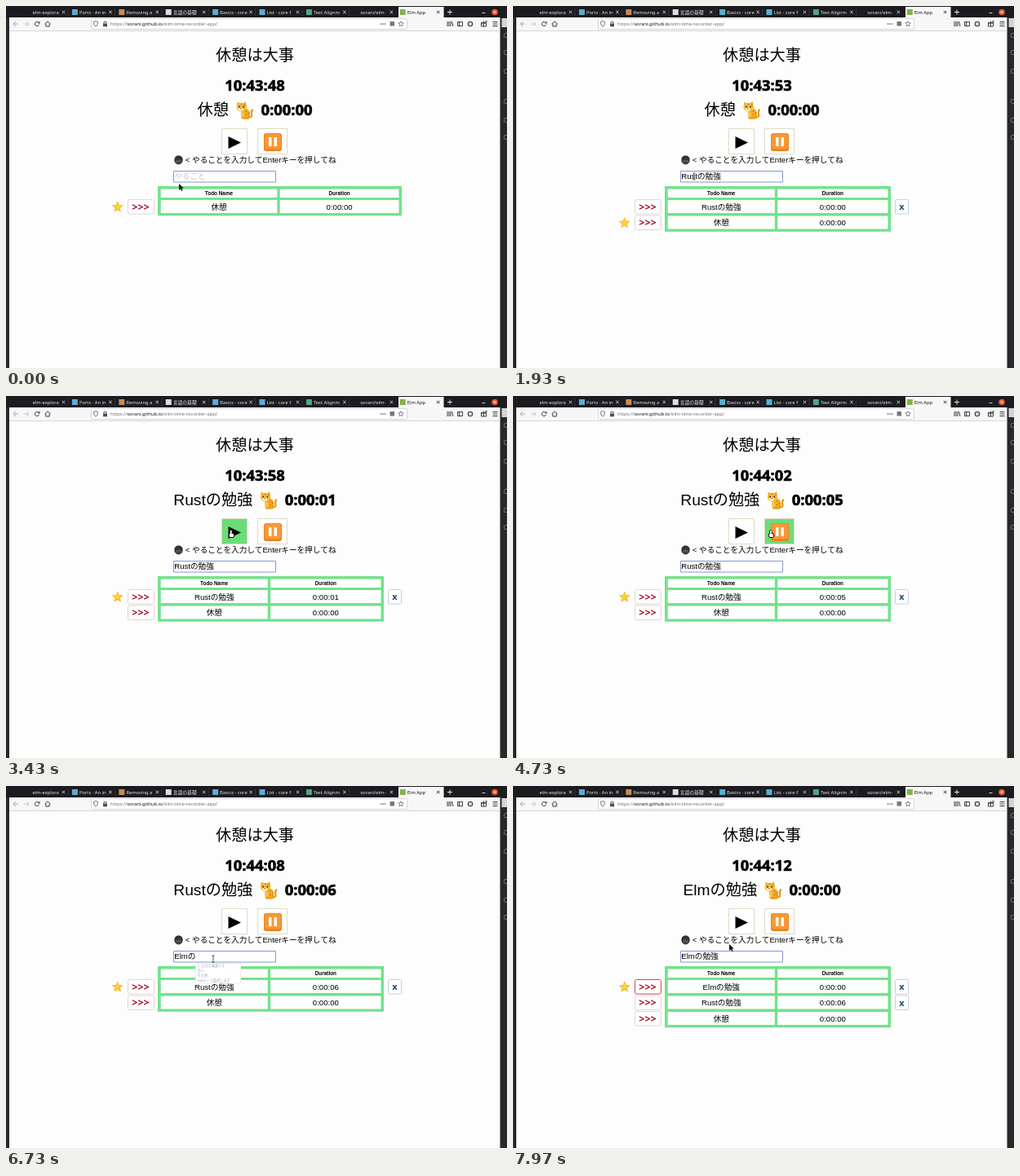
Write an HTML page with a canvas that moves like this. It is 614 px wide and 444 px high and loops after 8 s.

```html
<!DOCTYPE html>
<html lang="ja">
<head>
<meta charset="utf-8">
<title>Elm App</title>
<style>
  html, body { margin: 0; width: 100%; height: 100%; overflow: hidden; background: #fdfdfd; }
  canvas { display: block; width: 614px; height: 444px; }
</style>
</head>
<body>
<canvas id="stage"></canvas>
<script>
const W = 614, H = 444, LOOP = 8000;
const canvas = document.getElementById('stage');
const scale = Math.max(1, window.devicePixelRatio || 1);
canvas.width = W * scale;
canvas.height = H * scale;
const c = canvas.getContext('2d');

const ARIAL = '"Liberation Sans", "Noto Sans CJK JP", "Noto Sans CJK", sans-serif';
const NOTO = '"Noto Sans", "Noto Sans CJK JP", "Noto Sans CJK", sans-serif';
const PAGE = '#fdfdfd', GREEN = '#72e28c', INK = '#000', EDGE = 605.5;

// Milestones of the session, in ms
const AT = { addRust: 1830, pickRust: 2480, play: 3020, pause: 5060, addElm: 7300, pickElm: 7700 };

// Typing: [time, committed text, text still being composed]
const TYPING = [
  [0, '', ''], [430, 'R', ''], [500, 'Ru', ''], [570, 'Rus', ''], [640, 'Rust', ''],
  [1050, 'Rust', 'n'], [1160, 'Rust', 'の'], [1300, 'Rust', 'のb'], [1360, 'Rust', 'のべ'],
  [1420, 'Rust', 'のべn'], [1500, 'Rust', 'のべんky'], [1570, 'Rust', 'のべんきょう'],
  [1670, 'Rust', 'の勉強'], [1740, 'Rustの勉強', ''],
  [5720, 'Rustの勉', ''], [5780, 'Rustの', ''], [5830, 'Rust', ''], [5870, 'Ru', ''], [5920, '', ''],
  [6060, 'E', ''], [6140, 'El', ''], [6240, 'Elm', ''], [6460, 'Elm', 'n'], [6540, 'Elm', 'の'],
  [6620, 'Elmの', ''], [6780, 'Elmの', 'べ'], [6880, 'Elmの', 'べんk'], [6980, 'Elmの', 'べんきょう'],
  [7080, 'Elmの', '勉強'], [7160, 'Elmの勉強', '']
];

// Suggestion list: [from, to, x]
const HINTS = [[1050, 1740, 225.5], [6620, 7160, 232.5]];

// Pointer: [time, x, y]
const POINTER = [
  [0, 212, 219], [60, 212, 219], [260, 222, 209], [1980, 222, 209], [2380, 163, 246],
  [2540, 163, 246], [2900, 276, 168], [4450, 276, 168], [4850, 327, 168], [5120, 327, 168],
  [5420, 255, 209], [6200, 255, 209], [6500, 254, 212], [7300, 254, 212], [7600, 164, 246],
  [7740, 164, 246], [7960, 265, 195], [LOOP, 265, 195]
];

function box(x, y, w, h, fill, stroke, r = 0) {
  c.beginPath();
  c.roundRect(x, y, w, h, r);
  if (fill) { c.fillStyle = fill; c.fill(); }
  if (stroke) { c.strokeStyle = stroke; c.lineWidth = 1; c.stroke(); }
}

function text(s, x, y, size, opt = {}) {
  c.font = `${opt.weight || 400} ${size}px ${opt.font || ARIAL}`;
  c.textAlign = opt.align || 'left';
  c.textBaseline = 'alphabetic';
  c.fillStyle = c.strokeStyle = opt.color || INK;
  c.fillText(s, x, y);
  if (opt.heavy) {
    c.lineWidth = opt.heavy;
    c.strokeText(s, x, y);
  }
  return c.measureText(s).width;
}

function oval(x, y, rx, ry, fill) {
  c.beginPath();
  c.ellipse(x, y, rx, ry, 0, 0, 7);
  c.fillStyle = fill;
  c.fill();
}

function poly(points, fill) {
  c.beginPath();
  points.forEach(p => c.lineTo(...p));
  c.closePath();
  c.fillStyle = fill;
  c.fill();
}

function line(color, width, ...points) {
  c.beginPath();
  points.forEach((p, i) => i ? c.lineTo(...p) : c.moveTo(...p));
  c.strokeStyle = color;
  c.lineWidth = width;
  c.stroke();
}

function starPoints(x, y, r) {
  return Array.from({ length: 10 }, (_, i) => {
    const a = -Math.PI / 2 + i * Math.PI / 5, d = i % 2 ? r * 0.46 : r;
    return [x + d * Math.cos(a), y + d * Math.sin(a)];
  });
}

const two = n => String(n).padStart(2, '0');
const duration = s => `0:00:${two(s)}`;

function clock(t) {
  const s = Math.floor(43 * 60 + 48.15 + t * 0.003);
  return `10:${two(Math.floor(s / 60))}:${two(s % 60)}`;
}

function pointerAt(t) {
  const i = Math.max(1, POINTER.findIndex(p => p[0] > t));
  const [t0, x0, y0] = POINTER[i - 1], [t1, x1, y1] = POINTER[i];
  const u = Math.min(1, (t - t0) / (t1 - t0)), k = u * u * (3 - 2 * u);
  return [x0 + (x1 - x0) * k, y0 + (y1 - y0) * k];
}

function stateAt(t) {
  const spent = Math.max(0, Math.floor((Math.min(t, AT.pause) - AT.play) * 0.003));
  const rows = [['休憩', 0]];
  if (t >= AT.addRust) rows.unshift(['Rustの勉強', spent]);
  if (t >= AT.addElm) rows.unshift(['Elmの勉強', 0]);
  const active = t >= AT.pickElm ? 'Elmの勉強' : t >= AT.pickRust ? 'Rustの勉強' : '休憩';
  const picked = t >= AT.pickElm || (t >= AT.pickRust && t < AT.play);
  const [, done, draft] = TYPING.filter(k => k[0] <= t).pop();
  return { rows, active, picked, done, draft, mouse: pointerAt(t) };
}

function tabs() {
  box(0, 0, W, H, '#29272a');
  box(0, 0, W, 14, '#1b1b20');
  const names = ['elm-explora', 'Ports · An in', 'Removing a', '言語の基礎', 'Basics - core', 'List - core f',
    'Text Alignm', 'sorani/elm-', 'Elm App'];
  const icons = ['', '#5aaed0', '#c48b55', '#dcdcdc', '#5aaed0', '#5aaed0', '#4fa58a', '', '#7fb548'];
  box(481, 1, 55.5, 14, '#f7f7f8');
  names.forEach((name, i) => {
    const x = 24 + i * 57.4, on = i === 8, ink = on ? '#18181c' : '#e6e6e6';
    if (icons[i]) box(x - 0.5, 4, 7, 7, icons[i]);
    c.save();
    c.beginPath();
    c.rect(x + 8, 0, 35, 14);
    c.clip();
    text(name, x + 8.5, 9.8, 5.8, { font: NOTO, color: ink });
    c.restore();
    const k = x + 46.5;
    line(ink, 0.9, [k - 1.7, 5.8], [k + 1.7, 9.2]);
    line(ink, 0.9, [k + 1.7, 5.8], [k - 1.7, 9.2]);
    if (i < 7) line('#46464c', 0.6, [x + 52, 3], [x + 52, 12]);
  });
  line('#e6e6e6', 1, [541, 7.5], [547, 7.5]);
  line('#e6e6e6', 1, [544, 4.5], [544, 10.5]);
  line('#d0d0d0', 1, [583.5, 8.5], [587.5, 8.5]);
  oval(599, 7.5, 3.8, 3.8, '#e4572e');
  line('#fff', 0.8, [597.5, 6], [600.5, 9]);
  line('#fff', 0.8, [600.5, 6], [597.5, 9]);
}

function toolbar() {
  box(4, 14, EDGE - 4, 17, '#f7f7f8');
  [[12, '#a8a8ac', -1], [25, '#c6c6ca', 1]].forEach(([x, ink, d]) => {
    line(ink, 1, [x - 3, 22], [x + 3, 22]);
    line(ink, 1, [x, 19], [x + 3 * d, 22], [x, 25]);
  });
  const ink = '#3c3c42';
  c.strokeStyle = ink;
  c.lineWidth = 1;
  c.beginPath();
  c.arc(38, 22, 2.6, 0.3, 5.6);
  c.stroke();
  poly([[38.7, 21.4], [41.5, 21.4], [41.5, 18.6]], ink);
  line(ink, 1, [47.5, 22], [51, 18.8], [54.5, 22]);
  line(ink, 1, [48.8, 21.5], [48.8, 25], [53.2, 25], [53.2, 21.5]);

  box(104.5, 15.5, 387, 13, '#fff', '#d6d6da', 1);
  line('#66666c', 0.9, [107.5, 19.3], [110, 18.5], [112.5, 19.3], [112, 23], [110, 25.4], [108, 23], [107.5, 19.3]);
  box(119, 21.5, 5, 3.8, '#505056');
  line('#505056', 0.9, [120, 22], [120, 19.3], [123, 19.3], [123, 22]);
  let x = 128;
  [['https://', '#707076'], ['sorani.github.io', '#101014'], ['/elm-time-recorder-app/', '#707076']]
    .forEach(([s, color]) => { x += text(s, x, 24, 5.9, { font: NOTO, color }); });

  [459.5, 462, 464.5].forEach(d => oval(d, 22, 0.8, 0.8, ink));
  box(470.5, 19, 5.5, 5.5, '#77777c');
  const s = starPoints(484, 22, 3.4);
  line('#66666c', 0.8, ...s, s[0]);
  [541, 543, 545].forEach(d => line(ink, 1, [d, 18.8], [d, 25]));
  line(ink, 1, [546.5, 19], [548, 25]);
  box(553.5, 19.5, 6, 5, null, ink);
  line(ink, 1, [555.5, 19.5], [555.5, 24.5]);
  oval(569, 22, 3.3, 3.3, ink);
  oval(569, 22, 2.2, 2.2, '#d6d6da');
  box(582.5, 21, 6, 4, null, ink);
  line(ink, 1, [582, 20.5], [589, 20.5]);
  line(ink, 1, [585.5, 18.5], [585.5, 25]);
  oval(588.5, 19, 1.3, 1.3, '#3aa75a');
  [19.5, 22, 24.5].forEach(y => line(ink, 1, [596.5, y], [602.5, y]));
  line('#d6d6da', 1, [4, 30.5], [EDGE, 30.5]);

  box(607.5, 15, 6.5, 11, '#d4d4d4');
  [36, 57, 80, 117, 140, 161].forEach(y => box(610.5, y - 2.5, 4, 5, null, '#77757a', 1));
}

function cat(x, y) {
  c.save();
  c.translate(x, y);
  c.lineCap = 'round';
  c.strokeStyle = '#e79b16';
  c.lineWidth = 2.2;
  c.beginPath();
  c.moveTo(17, 20);
  c.bezierCurveTo(24, 20, 17, 14, 21, 11);
  c.stroke();
  oval(12.5, 15.5, 5.6, 6.5, '#f3ae25');
  oval(9, 18, 2, 4.5, '#f9c551');
  oval(13, 20.5, 5, 1.8, '#eda21f');
  poly([[2, 7], [2.5, 1], [7, 4]], '#eda21f');
  poly([[8.5, 3.5], [13, 0.8], [13.5, 7]], '#eda21f');
  oval(7.8, 7.6, 6.3, 5.4, '#f8b931');
  oval(6.8, 10, 3, 2.2, '#fff0c0');
  oval(5, 7.2, 0.9, 1.1, '#3c2a17');
  oval(10, 7.2, 0.9, 1.1, '#3c2a17');
  oval(7, 9.2, 0.9, 0.6, '#7a3b20');
  [[7.5, 3.7], [11.8, 4.8], [13.5, 12.5], [16, 15], [13.5, 17], [17, 18.2]]
    .forEach(([a, b]) => oval(a, b, 0.8, 0.8, '#a9631a'));
  c.restore();
}

function heading(t, s) {
  const digits = { font: NOTO, weight: 900, heavy: 0.6 };
  text('休憩は大事', 305, 67, 19.2, { align: 'center' });
  text(clock(t), 305, 103.5, 18.4, { ...digits, align: 'center' });
  c.font = `400 19.2px ${ARIAL}`;
  const w = c.measureText(s.active).width, x = 305.3 - (w + 103) / 2;
  text(s.active, x, 134, 19.2);
  cat(x + w + 8, 116.5);
  const row = s.rows.find(r => r[0] === s.active);
  text(duration(row[1]), x + w + 39.5, 134, 18.4, digits);
}

function controls(mouse) {
  const over = (x, w) => mouse[0] > x && mouse[0] < x + w && mouse[1] > 150 && mouse[1] < 182;
  const face = hover => hover ? '#6bdc78' : '#fff';
  box(264.5, 150.5, 31, 31, face(over(264, 31)), '#dcdcc4');
  poly([[272.5, 160], [288, 167.5], [272.5, 175]], INK);
  box(308.5, 150.5, 36, 31, face(over(309, 36)), '#dcdcc4');
  box(316, 156, 22, 22, '#ee7f1c', null, 3);
  box(317, 156.5, 20, 19, '#f89835', null, 3);
  box(322, 161, 3.5, 11, '#fff');
  box(328.5, 161, 3.5, 11, '#fff');

  oval(211.5, 188.8, 5.2, 5.6, '#303030');
  oval(211.5, 190.3, 3.3, 3.2, '#585858');
  oval(210, 188.3, 0.8, 0.7, '#101010');
  oval(213, 188.3, 0.8, 0.7, '#101010');
  line('#181818', 0.8, [209.8, 192], [213.2, 192]);
  text('< やることを入力してEnterキーを押してね', 219.8, 192.2, 9.6);
}

function table(s) {
  const n = s.rows.length, wide = n === 1;
  const right = wide ? 485 : 463, mid = wide ? 334 : 322.5, bottom = 257.3 + (n - 1) * 19.5;
  const cols = [[189.7, mid - 1.7], [mid + 1.7, right - 3.5]];
  box(186, 221, right - 186, bottom - 221, GREEN);
  const cells = (y, h, labels, size, weight) => cols.forEach(([a, b], i) => {
    box(a, y, b - a, h, '#fff');
    text(labels[i], (a + b) / 2, y + h / 2 + size * 0.38, size, { align: 'center', weight });
  });
  cells(224.5, 10.5, ['Todo Name', 'Duration'], 6.4, 700);
  s.rows.forEach(([name, secs], i) => {
    const y = 238 + i * 19.5, mine = name === s.active;
    cells(y, 16, [name, duration(secs)], 9.6);
    const lit = mine && s.picked;
    box(149.5, y - 0.5, 32, 17.5, '#fff', lit ? '#cf4a50' : '#e6d3d4', 2);
    text('>>>', 165, y + 12.5, 12.6, { font: NOTO, weight: 800, color: '#a5142a', align: 'center' });
    if (mine) {
      poly(starPoints(136.7, y + 8.8, 7.2), '#f0ac1c');
      poly(starPoints(136.7, y + 8.6, 5.4), '#fdd33c');
    }
    if (name !== '休憩') {
      box(468.5, y - 0.5, 16, 17.5, '#fff', '#c9cfe0', 1);
      text('x', 476.5, y + 12, 11, { font: NOTO, weight: 800, color: '#174a8c', align: 'center' });
    }
  });
}

function field(t, s) {
  box(205.5, 202.5, 125, 13.5, '#fff', '#8496d8');
  const x = 206.3, y = 212.3;
  if (!s.done && !s.draft) text('やること', x, y, 9.6, { color: '#c9c9cc' });
  const w = text(s.done, x, y, 9.6);
  const gap = s.draft === 'n' ? 2 : 0, start = x + w + gap;
  const d = s.draft ? text(s.draft, start, y, 9.6) : 0;
  if (d) line('#222', 0.8, [start, 214], [start + d, 214]);
  const typing = (t > 300 && t < AT.addRust) || (t > 5480 && t < AT.addElm);
  const blink = t % 340 < 170;
  if (typing && blink) line(INK, 0.9, [start + d + 0.6, 204], [start + d + 0.6, 214]);

  const hint = HINTS.find(([from, to]) => t >= from && t < to);
  if (!hint) return;
  const px = hint[2];
  box(px, 217.5, 55, 24.5, '#fff', '#ececf0');
  ['1. 入力の候補です', '次へ', 'その他', 'Tabキーで選択します'].forEach((label, i) =>
    text(label, px + 2, 222.3 + i * 5.8, 4.2, { color: '#a4a8b8' }));
}

function pointer([x, y]) {
  const inField = x > 205 && x < 331 && y > 202 && y < 216;
  const onButton = (y > 150 && y < 182 && x > 264 && x < 345) || (x > 149 && x < 182 && y > 237 && y < 297);
  c.save();
  c.translate(x, y);
  if (inField) {
    line('#444', 0.9, [0, -4], [0, 4]);
    line('#444', 0.9, [-1.6, -4], [1.6, -4]);
    line('#444', 0.9, [-1.6, 4], [1.6, 4]);
  } else if (onButton) {
    box(-1.7, -3.5, 2.6, 7, '#fff', '#111', 1.2);
    box(-2.7, 0.5, 6.2, 5, '#fff', '#111', 1.5);
    box(-1.1, -2.8, 1.5, 5, '#fff');
  } else {
    poly([[0, -1], [0, 7], [2, 5.4], [3.4, 8], [4.6, 7.3], [3.3, 4.8], [5.7, 4.5]], '#111');
  }
  c.restore();
}

function draw(now) {
  const t = now % LOOP, s = stateAt(t);
  c.setTransform(scale, 0, 0, scale, 0, 0);
  tabs();
  toolbar();
  box(4, 31, EDGE - 4, 413, PAGE);
  heading(t, s);
  controls(s.mouse);
  table(s);
  field(t, s);
  pointer(s.mouse);
}

const start = performance.now();
function tick() {
  draw(performance.now() - start);
  requestAnimationFrame(tick);
}
tick();
</script>
</body>
</html>
```
